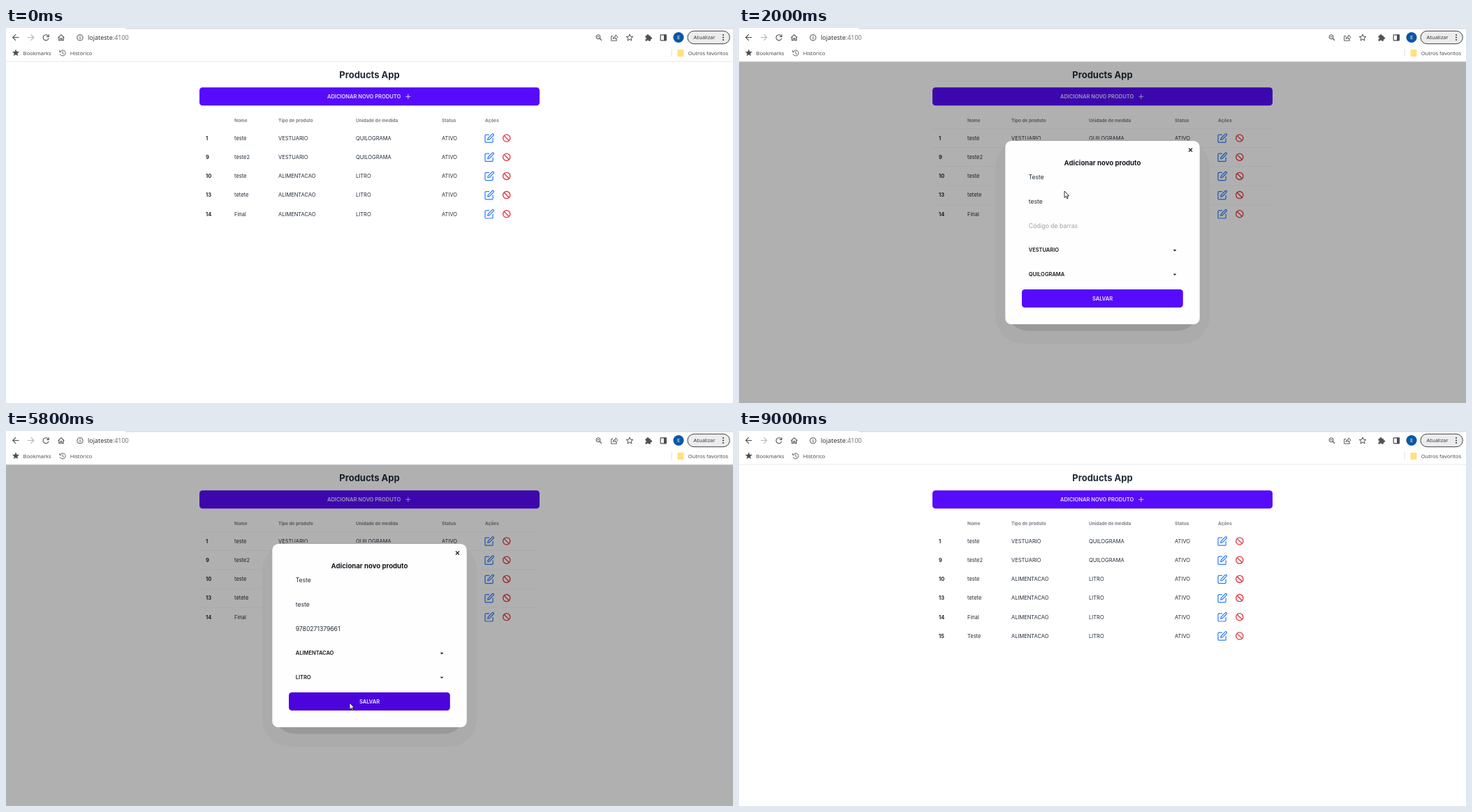
Animation, 1041 px wide and 538 px high, one loop 9500 ms. Source, as an HTML page with a canvas:

```html
<!DOCTYPE html>
<html lang="pt">
<head>
<meta charset="utf-8">
<title>Products App</title>
<style>
html, body { margin: 0; width: 100%; height: 100%; overflow: hidden; background: #fff; }
canvas { display: block; }
</style>
</head>
<body>
<canvas id="stage" width="1041" height="538"></canvas>
<script>
const ctx = document.getElementById('stage').getContext('2d');
const LOOP = 9500, STEP = 100;
const UI = '"Open Sans", "Noto Sans", sans-serif';
const APP = 'Inter, Roboto, sans-serif';
const PURPLE = '#570bfb', HOVER = '#4b04dc', INK = '#202b3a', ICON = '#4a4d51';

const ROWS = [
  ['1', 'teste', 'VESTUARIO', 'QUILOGRAMA'],
  ['9', 'teste2', 'VESTUARIO', 'QUILOGRAMA'],
  ['10', 'teste', 'ALIMENTACAO', 'LITRO'],
  ['13', 'tetete', 'ALIMENTACAO', 'LITRO'],
  ['14', 'Final', 'ALIMENTACAO', 'LITRO'],
  ['15', 'Teste', 'ALIMENTACAO', 'LITRO']
];
const COLS = [286, 327, 390, 501, 624, 686];
const TYPES = ['Tipo do produto', 'VESTUARIO', 'ALIMENTACAO', 'ELETRONICO'];
const UNITS = ['Unidade de medida', 'QUILOGRAMA', 'LITRO', 'UNIDADE'];

// Pointer track: time, x, y, shape
const TRACK = [
  [0, 0, 0, ''], [100, 20, 6, 'arrow'], [700, 499, 101, 'arrow'],
  [1300, 499, 101, 'arrow'], [1400, 492, 168, 'arrow'], [1500, 492, 168, ''],
  [1900, 466, 234, ''], [2000, 466, 234, 'arrow'], [2100, 467, 258, 'arrow'],
  [2200, 468, 284, 'beam'], [3000, 468, 284, 'beam'], [3100, 472, 290, 'beam'],
  [3200, 478, 306, 'hand'], [3300, 481, 320, 'hand'], [3500, 481, 320, 'hand'],
  [3600, 478, 332, 'arrow'], [3800, 468, 352, 'arrow'], [4100, 468, 352, 'arrow'],
  [4200, 467, 349, 'hand'], [4300, 468, 351, 'hand'], [4500, 468, 351, 'hand'],
  [4600, 467, 366, 'arrow'], [4900, 464, 393, 'arrow'], [5200, 464, 393, 'arrow'],
  [5400, 492, 390, 'arrow'], [8100, 492, 390, 'arrow'], [8500, 4, 43, 'arrow'],
  [8600, 4, 43, 'arrow'], [8700, 22, 38, 'arrow'], [8900, 8, 2, 'arrow'], [9000, 0, 0, '']
];

const PENCIL = new Path2D('M11 4H4a2 2 0 0 0-2 2v14a2 2 0 0 0 2 2h14a2 2 0 0 0 2-2v-7' +
  'M18.5 2.5a2.12 2.12 0 0 1 3 3L12 15l-4 1 1-4z');
const POINTERS = {
  arrow: new Path2D('M0 0V9.4L2.2 7.4 3.7 10.8 5.2 10.1 3.7 6.9H6.6Z'),
  hand: new Path2D('M2.4 1.2Q3.4-.2 4.2 1.2V5L7.6 5.7Q8.8 6 8.6 7.4L7.8 11.8H3.4L.5 8Q0 6.6 1.1 6.8L2.4 7.8Z'),
  beam: new Path2D('M-1.5-5H1.5M0-5V5M-1.5 5H1.5')
};

function text(str, x, y, size, { color = INK, weight = 400, font = APP, align = 'left' } = {}) {
  ctx.font = `${weight} ${size}px ${font}`;
  ctx.textAlign = align;
  ctx.fillStyle = color;
  ctx.fillText(str, x, y + size * 0.36);
}
function rect(x, y, w, h, color) {
  ctx.fillStyle = color;
  ctx.fillRect(x, y, w, h);
}
function round(x, y, w, h, r, fill, stroke, lw = 1) {
  ctx.beginPath();
  ctx.roundRect(x, y, w, h, r);
  if (fill) { ctx.fillStyle = fill; ctx.fill(); }
  if (stroke) { ctx.strokeStyle = stroke; ctx.lineWidth = lw; ctx.stroke(); }
}
function circle(x, y, r, fill, stroke, lw = 1) {
  round(x - r, y - r, 2 * r, 2 * r, r, fill, stroke, lw);
}
function line(d, x, y, color = ICON, lw = 1.1, fill) {
  ctx.save();
  ctx.translate(x, y);
  const path = new Path2D(d);
  if (fill) { ctx.fillStyle = fill; ctx.fill(path); }
  ctx.strokeStyle = color;
  ctx.lineWidth = lw;
  ctx.stroke(path);
  ctx.restore();
}
function star(x, y, r, fill) {
  let d = '';
  for (let i = 0; i < 10; i++) {
    const a = i * Math.PI / 5 - Math.PI / 2, k = i % 2 ? r * 0.45 : r;
    d += (i ? 'L' : 'M') + (Math.cos(a) * k).toFixed(2) + ' ' + (Math.sin(a) * k).toFixed(2);
  }
  line(d + 'Z', x, y, ICON, fill ? 0.3 : 1, fill);
}

function browser() {
  rect(0, 0, 1041, 48, '#fff');
  rect(171, 0, 870, 1.5, '#d9dce1');
  rect(0, 47.5, 1041, 1, '#e6e8eb');

  line('M4.5 0H-4M0-4.3L-4.3 0 0 4.3', 14, 13.5);
  line('M-4.5 0H4M0-4.3L4.3 0 0 4.3', 35.5, 13.5, '#b4b6b9');
  line('M3.4-2.2A4 4 0 1 0 4 1M4.2-4.4V-1.2H1', 57, 13.7);
  line('M-4.4 .2L0-4 4.4 .2M-3.2-.6V4H-1V1H1V4H3.2V-.6', 79, 13.7);
  circle(106, 13.8, 4.1, null, ICON);
  rect(105.5, 13.2, 1.1, 2.9, ICON);
  rect(105.5, 11.4, 1.1, 1.1, ICON);
  const host = 'lojateste';
  text(host, 117, 13.8, 9, { font: UI, color: '#25282c' });
  text(':4100', 117 + ctx.measureText(host).width, 13.8, 9, { font: UI, color: '#666a70' });

  circle(848, 12.8, 3, null, ICON);
  line('M2.2 2.2L5 5M-1.6 0H1.6', 848, 12.8);
  line('M-2-2.5H-4.4V4.2H3.4V2M-2 1.7Q-1.6-2 2-2V-4.2L5-.9 2 2.2V.2Q-.6 0-2 1.7Z', 871, 14, ICON, 0.9);
  star(893, 14, 5);
  round(915.5, 11, 7.5, 7.8, 1, '#505357');
  circle(919, 10.8, 1.7, '#505357');
  circle(923.4, 14.6, 1.7, '#505357');
  circle(915.7, 15, 1.2, '#fff');
  circle(919, 18.7, 1.2, '#fff');
  round(937.2, 9.8, 8, 8, 0.5, null, ICON, 1.2);
  rect(942, 9.5, 3.8, 8.6, ICON);
  circle(963, 13.5, 7.6, '#0b57a4');
  text('E', 963, 13.6, 7.6, { font: UI, color: '#fff', align: 'center' });
  round(976, 4.3, 60.3, 18.4, 9.2, '#ececed', '#3c3f43');
  text('Atualizar', 984.5, 13.6, 7.6, { font: UI, color: '#303338' });
  for (const y of [10, 13.5, 17]) circle(1027, y, 0.95, '#202327');

  const small = { font: UI, color: '#3d4045' };
  star(14, 35.8, 5, ICON);
  text('Bookmarks', 24.6, 36, 7.6, small);
  line('M-3.4-2.2A4 4 0 1 1-3.8 1.2M-4.4-4V-1.6H-2M0-2.4V.4L2 1.6', 81.2, 36, ICON, 0.9);
  text('Histórico', 91.7, 36, 7.6, small);
  rect(952.7, 30, 0.8, 11, '#d5d7da');
  round(961.5, 31, 9, 10, 1, '#ffe082');
  text('Outros favoritos', 976.7, 36, 7.6, small);
}

function edit(x, y) {
  ctx.save();
  ctx.translate(x, y);
  ctx.scale(0.62, 0.62);
  ctx.translate(-12, -12);
  ctx.lineJoin = ctx.lineCap = 'round';
  ctx.strokeStyle = '#2f7df6';
  ctx.lineWidth = 2;
  ctx.stroke(PENCIL);
  ctx.restore();
}

function rows(count) {
  for (let i = 0; i < count; i++) {
    const y = 158 + i * 27.2;
    ROWS[i].forEach((s, c) => text(s, COLS[c], y, 7.5, { weight: c ? 400 : 700 }));
    text('ATIVO', COLS[4], y, 7.5);
    edit(692.2, y);
    circle(716.8, y, 5.1, null, '#e2333b', 1.3);
    line('M-3.6-3.6L3.6 3.6', 716.8, y, '#e2333b', 1.3);
  }
}

function page(t, modal) {
  rect(0, 48, 1041, 490, '#fff');
  text('Products App', 520.5, 67.7, 13, { weight: 700, align: 'center' });
  round(277, 85.3, 487, 26, 4.3, t >= 700 && t < 1200 ? HOVER : PURPLE);
  text('ADICIONAR NOVO PRODUTO', 460, 98.3, 7.5, { weight: 600, color: '#e4e0ff' });
  line('M-3.5 0H3.5M0-3.5V3.5', 575.8, 98.3, '#e4e0ff', 0.9);
  ['Nome', 'Tipo de produto', 'Unidade de medida', 'Status', 'Ações'].forEach((s, i) =>
    text(s, COLS[i + 1], 133, 6.43, { weight: 700, color: '#7a7f87' }));
  if (modal.alpha) {
    for (let i = 0; i < 5; i++) {
      if (!modal.closing) rect(277, 144 + i * 27.2, 487, 0.8, '#f3f3f3');
      else if (i > 1) rect(364, 144 + i * 27.2, 312, 0.8, '#ececec');
    }
  }
  rows(t >= 7000 ? 6 : 5);
}

function list(items, top, active) {
  ctx.save();
  ctx.shadowColor = 'rgba(0,0,0,.3)';
  ctx.shadowBlur = 3;
  ctx.shadowOffsetY = 1.5;
  rect(405.5, top, 230.5, 41, '#fff');
  ctx.restore();
  round(406, top + 0.5, 229.5, 40.5, 0, '#fff', '#66686b', 0.9);
  rect(406.5, top + 0.7 + active * 9.75, 228.5, 9.75, '#1e90ff');
  items.forEach((s, i) => text(s, 415, top + 5.6 + i * 9.75, 7.5,
    { color: i === active ? '#fff' : i ? '#1b1e22' : '#85888c' }));
}

function form(t) {
  const reset = t >= 6500;
  const field = (value, hint, y) =>
    text(value || hint, 414.7, y, 8.58, { color: value ? INK : '#9aa0aa' });
  const select = (value, y) => {
    text(value, 414.7, y, 7.5, { weight: 600, color: '#15191f' });
    line('M-2.2-.9H2.2L0 1.4Z', 624, y + 0.5, '#15191f', 0.1, '#15191f');
  };
  line('M-2.5-2.5L2.5 2.5M2.5-2.5L-2.5 2.5', 646.5, 175, '#15191f', 1.1);
  text('Adicionar novo produto', 520.5, 193.2, 9.6, { weight: 700, align: 'center', color: '#15191f' });

  const focus = t < 2300 || t >= 5700 ? 0 : t < 3500 ? 269.5 : t < 4500 ? 304 : 338.7;
  if (focus) round(403.8, focus, 233.4, 28.5, 4.3, '#fff', '#c0c2c5');
  field(!reset && 'Teste', 'Nome', 214.3);
  field(!reset && 'teste', 'Descrição', 249);
  field(t >= 3100 && !reset && '9780271379661', 'Código de barras', 283.8);
  if (t >= 2400 && t < 2900) rect(414, 278, 0.9, 11, '#15191f');
  select(t >= 4000 && !reset ? 'ALIMENTACAO' : 'VESTUARIO', 318.5);
  select(t >= 5200 && !reset ? 'LITRO' : 'QUILOGRAMA', 353.2);
  round(405, 375, 230.8, 26, 4.3, t >= 5300 ? HOVER : PURPLE);
  text('SALVAR', 520.5, 388, 7.5, { weight: 600, align: 'center', color: '#f0edff' });

  if (t >= 3500 && t < 4000) list(TYPES, 331, t < 3700 ? 1 : 2);
  if (t >= 4500 && t < 5200) list(UNITS, 366, t < 4800 ? 1 : 2);
}

function modalState(t) {
  if (t < 1000 || t >= 6700) return { alpha: 0, dim: 0 };
  if (t >= 6500) {
    const k = (t - 6500) / 200;
    return { alpha: 1 - k * 1.2, scale: 1 - k * 0.1, dim: 0, closing: true };
  }
  const alpha = Math.min(1, 0.27 + (t - 1000) / 200);
  return { alpha, scale: alpha < 1 ? 0.91 + (alpha - 0.27) * 0.123 : 1, dim: alpha * 0.31 };
}

function modal(t, m) {
  if (m.dim) rect(0, 48, 1041, 490, `rgba(0,0,0,${m.dim})`);
  if (!m.alpha) return;
  ctx.save();
  ctx.translate(520.5, 293.5);
  ctx.scale(m.scale, m.scale);
  ctx.translate(-520.5, -293.5);
  if (m.alpha > 0.3) {
    ctx.globalAlpha = m.alpha;
    if (m.closing) {
      round(379.3, 181, 282.6, 260, 23, '#e9e9e9');
      round(392, 190, 257, 242, 22, '#d6d6d6');
    } else {
      round(367, 160, 307, 293, 40, '#ababab');
      round(385, 180, 271, 254.5, 28, '#999');
    }
    ctx.globalAlpha = 1;
  }
  round(381.3, 162, 278.4, 263, 8.6, '#fdfefd');
  if (m.alpha < 1) {
    // The table stays visible through the half-faded box
    ctx.save();
    ctx.clip();
    ctx.setTransform(1, 0, 0, 1, 0, 0);
    ctx.globalAlpha = 1 - m.alpha;
    rows(5);
    ctx.restore();
  }
  ctx.globalAlpha = m.alpha;
  form(t);
  ctx.restore();
}

function pointer(t) {
  let i = TRACK.length - 1;
  while (TRACK[i][0] > t) i--;
  const [t0, x0, y0, shape] = TRACK[i];
  if (!shape) return;
  const [t1, x1, y1] = TRACK[i + 1];
  const k = (t - t0) / (t1 - t0), e = k * k * (3 - 2 * k);
  ctx.save();
  ctx.translate(x0 + (x1 - x0) * e, y0 + (y1 - y0) * e);
  ctx.lineJoin = 'round';
  ctx.strokeStyle = '#1c1c20';
  ctx.lineWidth = 0.9;
  ctx.fillStyle = '#fff';
  if (shape !== 'beam') ctx.fill(POINTERS[shape]);
  ctx.stroke(POINTERS[shape]);
  ctx.restore();
}

function draw(now) {
  const t = Math.floor((now % LOOP) / STEP) * STEP;
  const m = modalState(t);
  page(t, m);
  modal(t, m);
  browser();
  pointer(t);
}

const start = performance.now();
function loop() {
  draw(performance.now() - start);
  requestAnimationFrame(loop);
}
loop();
</script>
</body>
</html>
```
